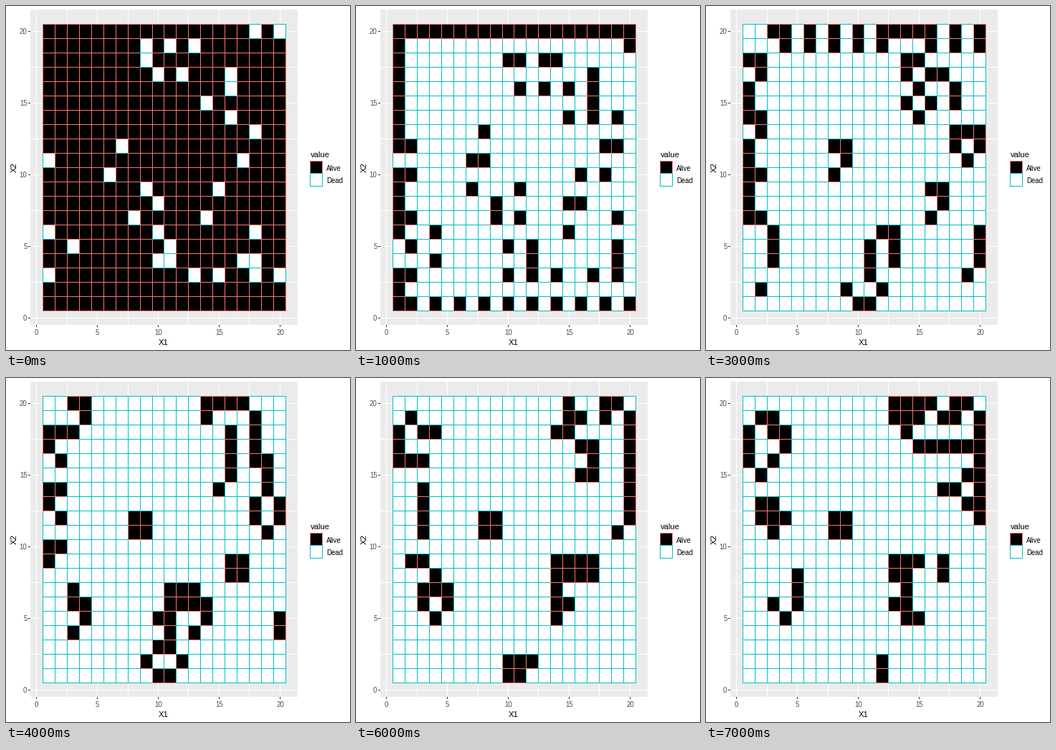
Write a matplotlib script that moves like this. It is 480 px wide and 480 px high and loops after 8000 ms.

```python
import numpy as np
import matplotlib.pyplot as plt
from matplotlib.animation import FuncAnimation
from matplotlib.colors import to_rgb

SIZE, N, STEPS = 480, 20, 8
STYLE = {1: ("#F8766D", "black"), 0: ("#00BFC4", "white")}
SMALL, LARGE = 9.6, 11.2

# Starting dead cells: one entry per row from the top row down.
# All later generations follow from these by the rule in step().
SEED = [[18, 20], [9, 11, 13], [9], [10, 12, 16], [16], [14], [16], [18], [7],
        [1, 17], [6], [9, 15], [10], [8, 14], [1, 10, 18], [3, 11],
        [10, 11, 17, 18], [1, 13, 15, 18, 20]]


def step(cells):
    """Game of Life updated in place, right to left and bottom to top."""
    new = cells.copy()
    for x in range(N, 0, -1):
        for y in range(1, N + 1):
            around = new[x - 1:x + 2, y - 1:y + 2].sum() - new[x, y]
            new[x, y] = around == 3 or (new[x, y] and around == 2)
    return new


def generations():
    cells = np.zeros((N + 2, N + 2), int)
    cells[1:-1, 1:-1] = 1
    for i, xs in enumerate(SEED):
        cells[xs, N - i] = 0
    out = [cells]
    while len(out) < STEPS:
        out.append(step(out[-1]))
    return out


def px(v):
    return int(42.95 + 16.955 * v)


def py(v):
    return int(435.5 - 20 * v)


def box(img, x0, y0, x1, y1, color):
    """Fill a pixel box, both ends included."""
    img[y0:y1 + 1, x0:x1 + 1] = to_rgb(color)


def tile(img, x0, y0, x1, y1, state):
    edge, fill = STYLE[state]
    box(img, x0, y0, x1, y1, edge)
    box(img, x0 + 1, y0 + 1, x1 - 1, y1 - 1, fill)


def backdrop():
    img = np.ones((SIZE, SIZE, 3))
    box(img, 34, 5, 406, 444, "#EBEBEB")
    for v in np.arange(0, N + 1, 2.5):
        box(img, px(v), 5, px(v), 444, "white")
        box(img, 34, py(v), 406, py(v), "white")
    for v in range(0, N + 1, 5):
        box(img, px(v), 445, px(v), 447, "#333333")
        box(img, 31, py(v), 33, py(v), "#333333")
    tile(img, 424, 216, 441, 233, 1)
    tile(img, 424, 233, 441, 251, 0)
    return img


def paint(cells):
    img = backdrop()
    for y in range(1, N + 1):
        for x in range(1, N + 1):
            tile(img, px(x - 0.5), py(y + 0.5), px(x + 0.5), py(y - 0.5),
                 cells[x, y])
    return img


def label(x, y, text, size, color="black", va="baseline", **kw):
    ax.text(x, y, text, fontsize=size * 0.72, color=color, va=va,
            family="Liberation Sans", **kw)


frames = [paint(cells) for cells in generations()]

fig = plt.figure(figsize=(4.8, 4.8), dpi=100)
ax = fig.add_axes([0, 0, 1, 1])
ax.axis("off")
board = ax.imshow(frames[0], extent=(0, SIZE, SIZE, 0),
                  interpolation="nearest", aspect="auto")

for v in range(0, N + 1, 5):
    label(px(v) + 0.5, 459, str(v), SMALL, "#4D4D4D", ha="center")
    label(29.5, py(v) + 4, str(v), SMALL, "#4D4D4D", ha="right")
label(219.5, 473, "X1", LARGE, ha="center")
label(11.5, 225.5, "X2", LARGE, va="center", ha="center", rotation=90)
label(424.7, 211, "value", LARGE)
label(447, 230, "Alive", SMALL)
label(447, 247, "Dead", SMALL)


def draw(i):
    board.set_data(frames[i])
    return [board]


anim = FuncAnimation(fig, draw, frames=STEPS, interval=1000, repeat=True,
                     repeat_delay=0, blit=False)
plt.show()
```
